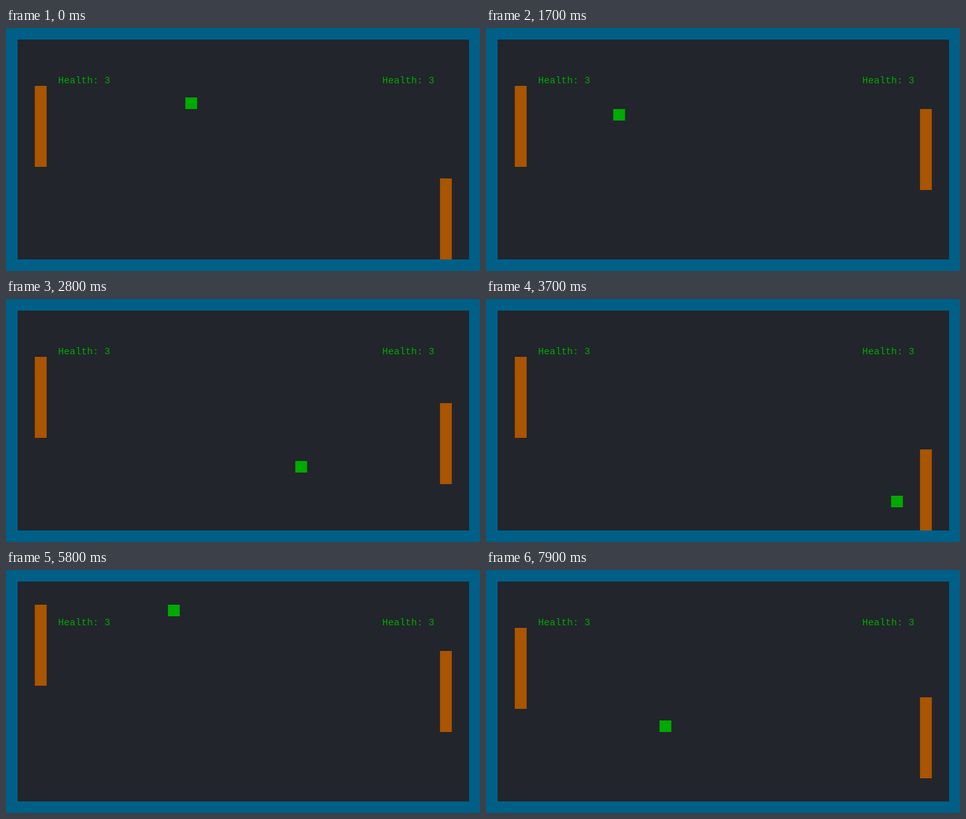
These frames come from a looping animation (737 by 378 pixels, 8 s). An HTML page:

```html
<!DOCTYPE html>
<html lang="en">
<head>
<meta charset="utf-8">
<title>Terminal paddle game</title>
<style>
  html, body { margin: 0; width: 100%; height: 100%; overflow: hidden; background: #005f87; }
  svg { display: block; width: 737px; height: 378px; }
  text { font: 15px "Liberation Mono", monospace; fill: #00aa00; white-space: pre; }
  .paddle { fill: #aa5500; }
  #ball { fill: #00aa00; }
</style>
</head>
<body>
<svg viewBox="0 0 737 378">
  <rect width="737" height="378" fill="#005f87"/>
  <rect x="18" y="18" width="702" height="342" fill="#22252b"/>
  <rect id="left" class="paddle"/>
  <rect id="right" class="paddle"/>
  <text x="81" y="86">Health: 3</text>
  <text x="585" y="86">Health: 3</text>
  <rect id="ball"/>
</svg>
<script>
const COL = 9, ROW = 18, LOOP = 8000, BEAT = 100, TICK = 150;
const TOP = 1, BOTTOM = 19, LEFT = 5, RIGHT = 75, SIZE = 2, STEP = 2;
const BLEED = 0.2; // soft vertical edges of the block glyphs

// Beats on which the screen is not refreshed
const HELD = new Set([10, 11, 18, 28, 29, 36, 40, 41, 63, 70, 72]);

// Each player steers one step per tick toward a goal: [tick, row]
const players = {
  left: { x: LEFT, y: 5, goals: [[3, 1], [9, 5], [15, 7], [17, 5], [28, 3], [30, 7], [34, 5], [36, 3], [47, 5]] },
  right: { x: RIGHT, y: 13, goals: [[6, 7], [16, 9], [21, 13], [26, 9], [34, 7], [51, 11]] }
};

function steer({ y, goals }, tick) {
  for (let t = 1; t <= tick; t++) {
    const goal = goals.filter(g => g[0] <= t).pop();
    if (goal) y += STEP * Math.sign(goal[1] - y);
  }
  return y;
}

// The ball climbs or falls a row per tick and takes a new speed at each paddle.
function ballAt(tick) {
  const speeds = [4, 3, 3];
  let x = 31, y = 6, dx = -3, dy = -1;
  for (let t = 1; t <= tick; t++) {
    const next = x + dx;
    if (next < LEFT + SIZE + 1) { x = LEFT + 1; dx = speeds.shift(); }
    else if (next > RIGHT - SIZE) { x = RIGHT + 1; dx = -speeds.shift(); }
    x += dx;
    y += dy;
    if (y === TOP || y === BOTTOM) dy = -dy;
  }
  return [x, y];
}

function place(id, x, y, rows) {
  const box = { x: x * COL - BLEED, y: y * ROW, width: SIZE * COL + 2 * BLEED, height: rows * ROW };
  const node = document.getElementById(id);
  for (const key in box) node.setAttribute(key, box[key]);
}

function draw() {
  let beat = Math.floor(performance.now() % LOOP / BEAT);
  while (HELD.has(beat)) beat--;
  const tick = Math.floor((beat + 0.5) * BEAT / TICK);
  for (const id in players) place(id, players[id].x, steer(players[id], tick), 7);
  place("ball", ...ballAt(tick), 1);
  requestAnimationFrame(draw);
}
draw();
</script>
</body>
</html>
```
